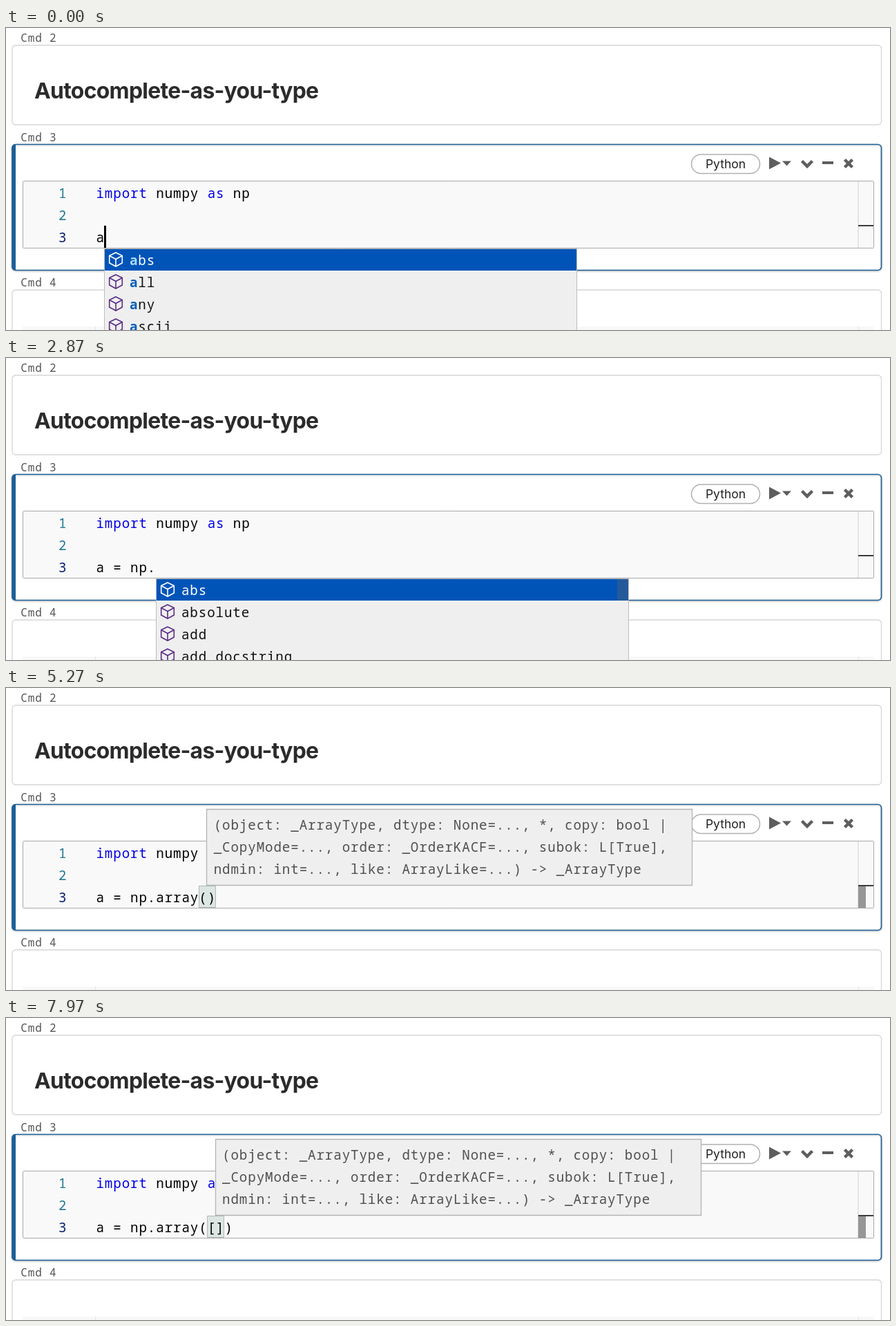
An HTML page with a canvas for the animation above (8 s loop, 1280 px wide and 437 px high).

```html
<!DOCTYPE html>
<html lang="en">
<head>
<meta charset="utf-8">
<title>Autocomplete-as-you-type</title>
<style>
html, body { margin: 0; width: 100%; height: 100%; overflow: hidden; background: #fff; }
canvas { display: block; }
</style>
</head>
<body>
<canvas id="stage" width="1280" height="437"></canvas>
<script>
const ctx = document.getElementById('stage').getContext('2d');
const LOOP = 8000, CHAR = 12.4, CODE_X = 130, ROW = 32;
const MONO = '"Noto Sans Mono", "DejaVu Sans Mono", monospace';
const SANS = 'Inter, "Open Sans", sans-serif';

const names = s => s.split(' ');
const NUMPY = names('abs absolute add add_docstring');

// Time, code with | at the cursor, suggestions, signature hint.
const steps = [
  [0, 'a|', names('abs all any ascii')],
  [100, 'a |'],
  [270, 'a =|'],
  [800, 'a = |'],
  [1600, 'a = n|'],
  [1640, 'a = n|', names('next not np nonlocal')],
  [1770, 'a = np|', names('np')],
  [1880, 'a = np.|'],
  [1940, 'a = np.|', NUMPY],
  [2900, 'a = np.a|', NUMPY],
  [3200, 'a = np.ar|', names('arange arccos arccosh arcsin')],
  [3450, 'a = np.arr|', names('array array2string array_api array_equal')],
  [4250, 'a = np.array|'],
  [4650, 'a = np.array(|)'],
  [4750, 'a = np.array(|)', null, true],
  [7400, 'a = np.array([|])', null, true],
].map(([time, code, list, hint]) => ({ time, code, list, hint }));

const signature = [
  '(object: _ArrayType, dtype: None=..., *, copy: bool |',
  '_CopyMode=..., order: _OrderKACF=..., subok: L[True],',
  'ndmin: int=..., like: ArrayLike=...) -> _ArrayType',
];

function rect(x, y, w, h, color) {
  ctx.fillStyle = color;
  ctx.fillRect(x, y, w, h);
}

function box(x, y, w, h, fill, stroke, radius = 0, line = 1) {
  ctx.beginPath();
  ctx.roundRect(x, y, w, h, radius);
  ctx.fillStyle = fill;
  ctx.fill();
  ctx.strokeStyle = stroke;
  ctx.lineWidth = line;
  ctx.stroke();
}

function path(points, close) {
  ctx.beginPath();
  points.forEach(([x, y]) => ctx.lineTo(x, y));
  if (close) ctx.closePath();
}

function line(points, color, width, close) {
  path(points, close);
  ctx.strokeStyle = color;
  ctx.lineWidth = width;
  ctx.stroke();
}

function shape(points, color) {
  path(points, true);
  ctx.fillStyle = color;
  ctx.fill();
}

// Characters sit on a fixed grid, slightly looser than the font's own.
function mono(text, x, y, color, weight = 400, advance = CHAR) {
  ctx.font = `${weight} ${advance * 1.55}px ${MONO}`;
  ctx.fillStyle = color;
  ctx.textAlign = 'center';
  [...text].forEach((c, i) => ctx.fillText(c, x + (i + .5) * advance, y));
  ctx.textAlign = 'left';
}

function label(text, y) {
  mono(text, 21, y, '#555', 400, 10.4);
}

function toolbar() {
  const gray = '#5e5e5e';
  box(992.5, 183, 99, 27.5, '#fff', '#b0b0b0', 14, 1.5);
  ctx.font = `400 17.5px ${SANS}`;
  ctx.fillStyle = '#222';
  ctx.textAlign = 'center';
  ctx.fillText('Python', 1042, 203);
  ctx.textAlign = 'left';
  shape([[1105, 186.5], [1122, 195.5], [1105, 204.5]], gray);
  shape([[1124, 192.5], [1137, 192.5], [1130.5, 199.5]], gray);
  line([[1152.5, 192.5], [1160, 200], [1167.5, 192.5]], gray, 4.5);
  rect(1182, 193, 16, 4, gray);
  line([[1214.5, 190.5], [1225.5, 201.5]], gray, 4.5);
  line([[1225.5, 190.5], [1214.5, 201.5]], gray, 4.5);
}

function title() {
  const text = 'Autocomplete-as-you-type';
  ctx.letterSpacing = '-0.7px';
  ctx.font = `700 100px ${SANS}`;
  const size = 100 * 411 / ctx.measureText(text).width;
  ctx.font = `700 ${size + .9}px ${SANS}`;
  ctx.fillStyle = '#2b2b2b';
  ctx.fillText(text, 41, 101.5);
  ctx.letterSpacing = '0px';
}

function page() {
  rect(0, 0, 1280, 437, '#fff');
  label('Cmd 2', 20);
  label('Cmd 3', 164);
  label('Cmd 4', 374);

  box(9, 25, 1258.5, 115, '#fff', '#d6d6d6', 5, 1.3);
  title();

  box(9, 379, 1258.5, 80, '#fff', '#d6d6d6', 5, 1.3);
  rect(24, 432, 1233, 5, '#f8f8f8');
  rect(129, 432, 1, 5, '#e4e4e4');
  rect(1234, 432, 1, 5, '#e4e4e4');

  ctx.save();
  ctx.shadowColor = 'rgba(0,0,0,.2)';
  ctx.shadowBlur = 3;
  ctx.shadowOffsetY = 1;
  box(9, 168.5, 1258.5, 182, '#fff', '#1d5f96', 5, 1.6);
  ctx.restore();
  ctx.beginPath();
  ctx.roundRect(8.5, 168, 5.5, 183, [5, 0, 0, 5]);
  ctx.fillStyle = '#1d5f96';
  ctx.fill();
  toolbar();
}

function editor({ code }, column, blinkOn) {
  box(24.5, 221.5, 1232, 97, '#f9f9f9', '#a8a8a8', 1);
  rect(1233.5, 222, 1, 96, '#d0d0d0');
  for (let n = 1; n <= 3; n++) {
    mono(String(n), 75.5, 214 + n * ROW, n == 3 ? '#0b216f' : '#237893');
  }
  mono('import', CODE_X, 246, '#0000e6');
  mono('numpy', CODE_X + 7 * CHAR, 246, '#000');
  mono('as', CODE_X + 13 * CHAR, 246, '#0000e6');
  mono('np', CODE_X + 16 * CHAR, 246, '#000');

  const x = CODE_X + column * CHAR;
  if (/[([]\|/.test(code)) {
    box(Math.round(x - CHAR) + .5, 286.5, 24, 31, '#dce6e2', '#b2b8b6');
    rect(1234, 287, 11, 31, '#969696');
  }
  rect(1234, 285, 22, 2, '#3c3c3c');
  mono(code.replace('|', ''), CODE_X, 310, '#000');
  if (blinkOn) rect(Math.round(x - .5), 286, 3, 32, '#000');
}

function cube(x, y, color) {
  const at = pts => pts.map(([dx, dy]) => [x + dx, y + dy]);
  line(at([[0, -10], [9.3, -5.5], [9.3, 5], [0, 10], [-9.3, 5], [-9.3, -5.5]]), color, 1.6, true);
  line(at([[-9.3, -5.5], [0, -.5], [9.3, -5.5]]), color, 1.6);
  line(at([[0, -.5], [0, 10]]), color, 1.6);
}

function suggestions(list, before) {
  const prefix = before.match(/\w*$/)[0];
  const left = Math.round(CODE_X + before.length * CHAR);
  box(left + .5, 319.5, 684, list.length * ROW + 1, '#efefef', '#bdbdbd');
  list.forEach((name, i) => {
    const y = 320 + i * ROW, picked = i == 0;
    if (picked) rect(left + 1, y, 683, ROW - 1, '#0054b8');
    if (name == 'array_api') {
      mono('{}', left + 5, y + 22, '#555');
    } else {
      cube(left + 17, y + 15, picked ? '#fff' : '#5b2d86');
    }
    const textX = left + 36.5, y0 = y + 23;
    mono(prefix, textX, y0, picked ? '#a5dcff' : '#005fb8', 700);
    mono(name.slice(prefix.length), textX + prefix.length * CHAR, y0, picked ? '#fff' : '#111');
  });
  if (before.includes('.')) {
    rect(left + 668, 320, 16, prefix.length > 1 ? 117 : 31, 'rgba(100,100,100,.36)');
  }
}

function signatureHint(x) {
  box(Math.round(x) - .5, 175.5, 703, 110, '#efefef', '#b4b4b4', 0, 1.3);
  signature.forEach((text, i) => mono(text, x + 9, 205 + i * ROW, '#505050'));
}

function draw(now) {
  const time = now % LOOP;
  const step = steps.findLast(s => s.time <= time);
  const typedAt = steps.find(s => s.code == step.code).time;
  const column = step.code.indexOf('|');
  page();
  editor(step, column, (time - typedAt) % 1000 < 500);
  if (step.list) suggestions(step.list, step.code.slice(0, column));
  if (step.hint) signatureHint(CODE_X + column * CHAR);
}

let start;
function tick(now) {
  start ??= now;
  draw(now - start);
  requestAnimationFrame(tick);
}
draw(0);
requestAnimationFrame(tick);
</script>
</body>
</html>
```
